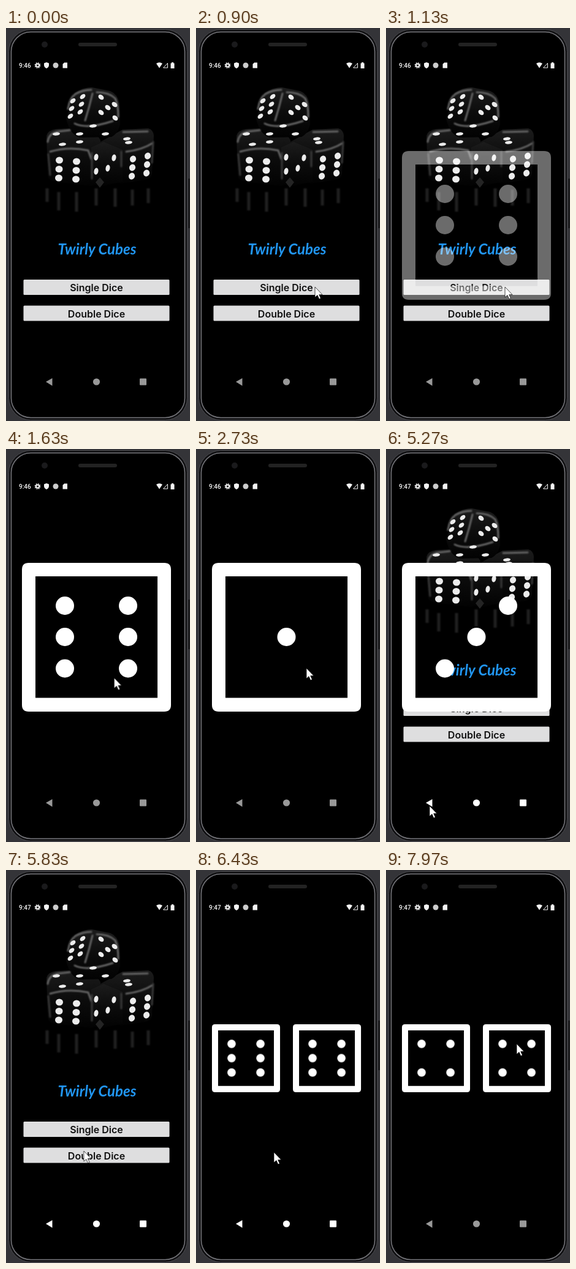
Write an HTML page that moves like this. It is 300 by 642 pixels and loops after 8000 ms.

```html
<!DOCTYPE html>
<html lang="en">
<head>
<meta charset="utf-8">
<title>Dice app</title>
<style>
html, body { margin: 0; width: 100%; height: 100%; overflow: hidden; background: #000; }
svg { display: block; width: 300px; height: 642px; }
.label { font: 600 16px Inter, Roboto, sans-serif; fill: #101010; text-anchor: middle; }
.title { font: italic 700 24px Lato, "Open Sans", sans-serif; fill: #2196f3; text-anchor: middle; }
.clock { font: 500 10px Roboto, Inter, sans-serif; fill: #f4f4f4; }
.soft { filter: blur(1.2px); }

.clock, #home, #single, #double, #nav, #cursor { animation: 8s linear infinite; }
#early { animation-name: early; }
#late { animation-name: late; }
#home { animation-name: home; }
#single { animation-name: single; }
#double { animation-name: double; }
#nav { animation-name: nav; }
#cursor { animation-name: cursor; }

@keyframes early { 0%, 62% { opacity: 1 } 62.01%, 100% { opacity: 0 } }
@keyframes late { 0%, 62% { opacity: 0 } 62.01%, 100% { opacity: 1 } }
@keyframes nav {
  0%, 62% { fill: #999 }
  62.4%, 87.5% { fill: #fff }
  92%, 100% { fill: #999 }
}
@keyframes home {
  0%, 14.4% { opacity: 1 }
  16.2%, 64.2% { opacity: 0 }
  65.4%, 76.6% { opacity: 1 }
  78.4%, 100% { opacity: 0 }
}
@keyframes single {
  0%, 13.1% { opacity: 0; transform: translateY(25px) }
  14.13% { opacity: .42; transform: translateY(15px) }
  15.5% { opacity: 1; transform: translateY(4px) }
  17%, 66% { opacity: 1; transform: none }
  67.8% { opacity: 0; transform: translateY(20px) }
  100% { opacity: 0; transform: translateY(25px) }
}
@keyframes double {
  0%, 75.3% { opacity: 0; transform: translateY(25px) }
  76.33% { opacity: .42; transform: translateY(15px) }
  77.7% { opacity: 1; transform: translateY(4px) }
  79.2%, 100% { opacity: 1; transform: none }
}
@keyframes cursor {
  0%, .37% { opacity: 0; transform: translate(253px, 590px) }
  .38% { opacity: 1; transform: translate(253px, 590px) }
  8.4%, 14.3% { transform: translate(194px, 423px) }
  20.3% { transform: translate(176px, 375px) }
  21.3% { transform: translate(180px, 362px) }
  31.6%, 54.6% { transform: translate(180px, 358px) }
  57.5%, 66% { transform: translate(71px, 583px) }
  71.3%, 72.1% { transform: translate(113px, 456px) }
  72.9%, 75% { transform: translate(127px, 459px) }
  80%, 85.4% { transform: translate(127px, 461px) }
  95.4%, 95.9% { transform: translate(97px, 352px) }
  99.6%, 100% { opacity: 1; transform: translate(213px, 284px) }
}
</style>
</head>
<body>
<svg viewBox="0 0 300 642">
  <defs>
    <linearGradient id="body" x2="0" y2="1">
      <stop offset="0" stop-color="#1c1c1c"/>
      <stop offset=".5" stop-color="#0c0c0c"/>
      <stop offset="1" stop-color="#020202"/>
    </linearGradient>
  </defs>

  <!-- phone -->
  <rect width="300" height="642" fill="#343438"/>
  <rect x="297" y="246" width="3" height="81" fill="#1c1c1e"/>
  <rect x="4.500" y="2.500" width="291" height="638" rx="36" fill="#101012" stroke="#4c4c50"/>
  <rect x="8.500" y="6.500" width="283" height="630" rx="32" fill="#000" stroke="#77777c" stroke-width="1.500"/>
  <rect x="118" y="24" width="63" height="6" rx="3" fill="#222"/>
  <circle cx="63" cy="27" r="5" fill="#1a1a1c"/>

  <!-- status bar -->
  <text class="clock" id="early" x="21" y="65">9:46</text>
  <text class="clock" id="late" x="21" y="65">9:47</text>
  <g fill="#f4f4f4">
    <circle cx="51.500" cy="61" r="2.600" fill="none" stroke="#f4f4f4" stroke-width="2"/>
    <circle cx="51.500" cy="61" r="4.200" fill="none" stroke="#f4f4f4" stroke-width="1.400" stroke-dasharray="1.7 1.6"/>
    <path d="M66 56l4 1.600v3q0 3.600-4 5.400q-4-1.800-4-5.400v-3z"/>
    <circle cx="81" cy="61" r="4.500" fill="#ccc"/>
    <path d="M95 56.500h5v9h-7.500v-6.500z"/>
    <path d="M245 58q5-3.500 10 0l-5 7.500z"/>
    <path d="M263.500 57.500v7.500h-7z" fill="none" stroke="#f4f4f4"/>
    <path d="M268.500 57.500h1.500v-1.500h3v1.500h1.500v8.500h-6z"/>
  </g>

  <g id="home">
    <g id="photo">
      <g class="soft" fill="none" stroke="#202020" stroke-width="5">
        <path d="M67 262v22M86 268v30M115 268v32M147 262v28M178 262v30M206 264v26M232 262v24"/>
      </g>
      <g fill="url(#body)">
        <path d="M66 176q2-9 16-11l50-2q10 1 22 20v71l-16 4-58-7q-12-2-12-12z"/>
        <path d="M190 166l42-2q8 2 9 12l-3 62q-1 8-10 10l-38 6-47-4v-58z"/>
        <path d="M139 195l20-9 31 13v52l-37 8-15-8z"/>
        <path d="M112 106q14-9 28-9l30 6q12 5 15 20l1 35q-4 15-14 20l-52 1q-16-5-22-31z"/>
      </g>
      <g class="soft" fill="none" stroke="#666" stroke-width="3" stroke-linecap="round">
        <path d="M68 186q2-15 18-17l18-2M72 202q30-9 62-2l5 14M191 170l40-1M196 202q26-3 43-14"/>
        <path d="M101 132q3-18 12-24q12-7 26-7M141 107q-5 22-12 44M148 105q20 0 30 10q5 10 5 30M112 156q20 10 62-4"/>
        <path d="M69 206l3 34M140 204v42M188 202v24M240 186l-2 34" stroke="#383838"/>
      </g>
      <path d="M153 244l7 8-7 9-7-9z" fill="#242424"/>
      <g id="spots" fill="#ececec"></g>
    </g>
    <text class="title" x="148.500" y="370">Twirly Cubes</text>
    <g fill="#dededf">
      <rect x="28.500" y="411" width="238" height="25" rx="1.500"/>
      <rect x="28.500" y="453.500" width="238" height="25" rx="1.500"/>
    </g>
    <text class="label" x="147.500" y="430">Single Dice</text>
    <text class="label" x="147.500" y="472.500">Double Dice</text>
  </g>

  <g id="single"></g>
  <g id="double"></g>

  <g id="nav">
    <path d="M65 578l10.500-6v12.500z"/>
    <circle cx="147.500" cy="578" r="5.600"/>
    <rect x="218" y="572.500" width="11" height="11" rx="1"/>
  </g>
  <path id="cursor" d="M0 0v17l4-3.500 2.800 6.300 2.600-1.200-2.700-6h5.300z" fill="#fff" stroke="#000" stroke-width=".7"/>
</svg>
<script>
const LOOP = 8000;
const $ = id => document.getElementById(id);

function add(parent, tag, attrs) {
  const el = document.createElementNS("http://www.w3.org/2000/svg", tag);
  for (const key in attrs) el.setAttribute(key, attrs[key]);
  return parent.appendChild(el);
}

function spot(cx, cy, rx = 5.5, ry = 5, turn = 0) {
  add($("spots"), "ellipse", { cx, cy, rx, ry, transform: `rotate(${turn} ${cx} ${cy})` });
}

// Two columns of three spots, sheared to follow a side of a cube.
function sixSpots(x, y, dx, dy, sx, sy, rx, ry, turn) {
  for (let col = 0; col < 2; col++)
    for (let row = 0; row < 3; row++)
      spot(x + col * dx + row * sx, y + col * dy + row * sy, rx, ry, turn);
}

sixSpots(109, 119, 16, -7, -2, 12.5, 5, 3.4, -40);
sixSpots(87, 216, 28, 2, -.5, 14.5, 6, 5.5, 0);
sixSpots(207, 214, 24, -5, -1, 14, 5, 5.5, 20);
[[155, 113], [177, 125], [166, 130], [155, 138], [178, 147]].forEach(p => spot(...p, 5, 3.6, 40));
[[142, 160], [120, 173], [162, 173], [82, 173], [92, 190], [120, 186], [197, 181], [200, 187]]
  .forEach(p => spot(...p, 6, 2.6, -5));
[[147, 211], [147, 234], [166, 229], [176, 212]].forEach(p => spot(...p, 3.5, 5.5, 10));

// Which faces light up each group of pips.
const groups = [
  { pips: [[173, 70], [70, 172.5]], on: f => f > 1 },
  { pips: [[70, 70], [173, 172.5]], on: f => f > 3 },
  { pips: [[70, 121], [173, 121]], on: f => f === 6 },
  { pips: [[121.5, 121]], on: f => f % 2 === 1 }
];

// faces: [time in ms, face] pairs
function die(parent, x, y, scale, faces) {
  const g = add(parent, "g", { transform: `translate(${x} ${y}) scale(${scale})`, fill: "#fff" });
  add(g, "path", {
    d: "M11 0H232Q243 0 243 11V232Q243 243 232 243H11Q0 243 0 232V11Q0 0 11 0ZM22 22V220.500H221V22Z",
    "fill-rule": "evenodd"
  });
  for (const { pips, on } of groups) {
    const set = add(g, "g", {});
    for (const [cx, cy] of pips) add(set, "circle", { cx, cy, r: 15 });
    const frames = faces.map(([ms, f]) => ({ offset: ms / LOOP, opacity: +on(f), easing: "step-end" }));
    frames.push({ ...frames[frames.length - 1], offset: 1 });
    set.animate(frames, { duration: LOOP, iterations: Infinity });
  }
}

function roll(start, step, list) {
  return list.map((f, i) => [start + i * step, f]);
}

die($("single"), 26, 186, 1, [
  [0, 6],
  ...roll(1730, 100, [3, 5, 1, 4, 2, 6, 3, 1, 5]),
  ...roll(2630, 90, [4, 1, 6, 3, 5, 4, 2]),
  [4000, 3]
]);
die($("double"), 26, 252, .457, [[0, 6], ...roll(6900, 120, [5, 4, 6, 5, 6, 4])]);
die($("double"), 158, 252, .457, [[0, 6], ...roll(6900, 120, [4, 6, 5, 4, 5, 4])]);
</script>
</body>
</html>
```
